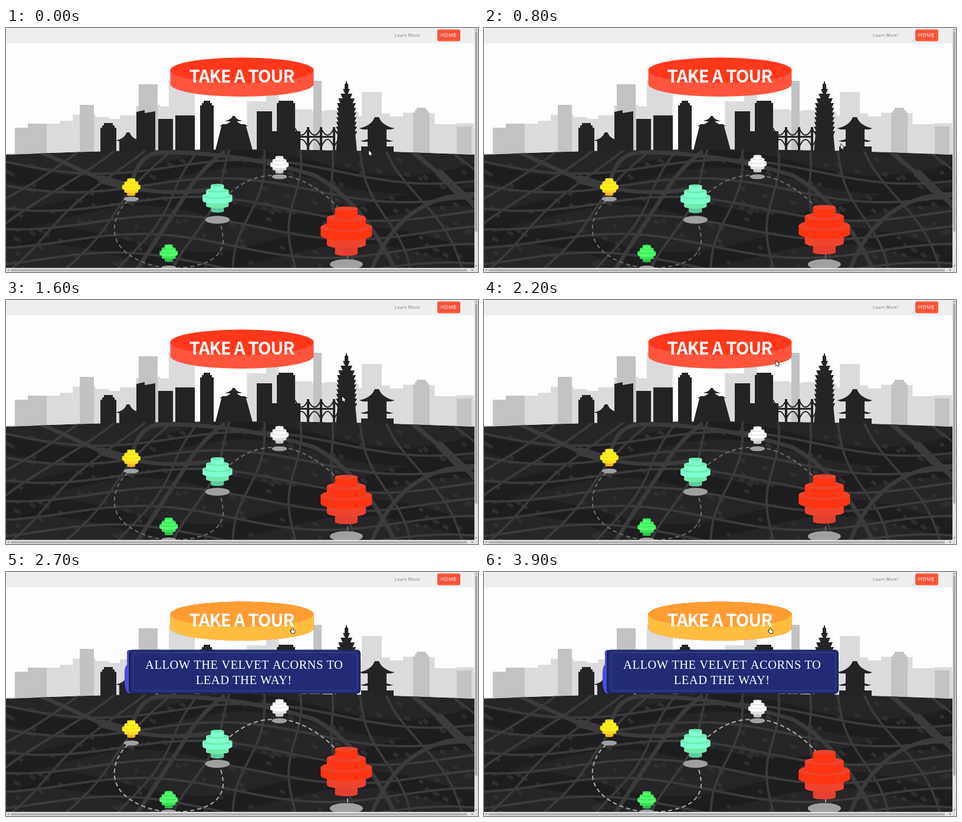
An HTML page with a canvas for the animation above (4000 ms loop, 800x416 px).

```html
<!DOCTYPE html>
<html lang="en">
<head>
<meta charset="utf-8">
<title>Take a tour</title>
<style>
html, body { margin: 0; width: 100%; height: 100%; overflow: hidden; background: #fdfcfe; }
canvas { display: block; }
</style>
</head>
<body>
<canvas id="stage" width="800" height="416"></canvas>
<script>
const W = 800, H = 416, EDGE = 794, LOOP = 4000, HOVER = 2280;
const INK = '#242325', MID = '#c3c2c4', LIGHT = '#dbdadc', ROAD = '#3b3a3c';
const stage = document.getElementById('stage').getContext('2d');

function fillPath(c, d, color) {
  c.fillStyle = color;
  c.fill(new Path2D(d));
}

function strokePath(c, d, color, width) {
  c.strokeStyle = color;
  c.lineWidth = width;
  c.stroke(new Path2D(d));
}

function box(c, x, y, w, h, color, r = 0) {
  c.fillStyle = color;
  c.beginPath();
  c.roundRect(x, y, w, h, r);
  c.fill();
}

function oval(c, x, y, rx, ry, color) {
  c.fillStyle = color;
  c.beginPath();
  c.ellipse(x, y, rx, ry, 0, 0, Math.PI * 2);
  c.fill();
}

function disc(c, x, top, bottom, rx, ry, wall, lid) {
  c.fillStyle = wall;
  c.beginPath();
  c.ellipse(x, top, rx, ry, 0, Math.PI, 0);
  c.ellipse(x, bottom, rx, ry, 0, 0, Math.PI);
  c.fill();
  oval(c, x, top, rx, ry, lid);
}

function label(c, text, x, y, font, spacing, color = '#fff') {
  c.font = font;
  c.fillStyle = color;
  c.letterSpacing = spacing + 'px';
  c.textAlign = 'center';
  c.fillText(text, x + spacing / 2, y);
}

// smooth open line through y = f(x) or x = f(y)
function curve(c, from, to, point, width) {
  c.beginPath();
  for (let s = from; s <= to; s += 6) c.lineTo(...point(s));
  c.lineWidth = width;
  c.stroke();
}

function seeded(seed) {
  return () => (seed = (seed * 16807) % 2147483647) / 2147483647;
}

function layer(paint) {
  const canvas = document.createElement('canvas');
  canvas.width = W;
  canvas.height = H;
  paint(canvas.getContext('2d'));
  return canvas;
}

function tower(c, color, x, y, w, steps = 0) {
  for (let s = 0; s <= steps; s++) {
    const top = y + 4 * (steps - s);
    box(c, x + 3 * s, top, w - 6 * s, 220 - top, color);
  }
}

function roof(c, x, y, half, h) {
  const low = y + h * 0.9;
  fillPath(c, `M${x - half} ${low}Q${x - half * 0.3} ${y + h * 0.7} ${x - half * 0.12} ${y}H${x + half * 0.12}
    Q${x + half * 0.3} ${y + h * 0.7} ${x + half} ${low}L${x + half * 0.8} ${y + h}H${x - half * 0.8}Z`, INK);
}

function paintFarSkyline(c) {
  const rand = seeded(21);
  for (let x = 38, w; x < EDGE; x += w) {
    w = 18 + rand() * 20;
    const y = 108 + Math.abs(x - 400) * 0.12 + rand() * 22;
    if (x < 300 || x > 405) tower(c, LIGHT, x, y, w + 1);
  }
  tower(c, LIGHT, 276, 90, 44);
  tower(c, LIGHT, 603, 109, 34);
  tower(c, MID, 15, 170, 22);
  tower(c, MID, 37, 163, 32);
  tower(c, MID, 125, 131, 24);
  tower(c, MID, 225, 96, 32);
  tower(c, MID, 521, 90, 14);
  tower(c, MID, 690, 136, 28, 2);
  tower(c, MID, 764, 168, 25);
  tower(c, MID, 0, 214, EDGE);
}

function paintTallTower(c, x) {
  box(c, x - 1, 91, 2, 30, INK);
  box(c, x - 3, 95, 6, 12, INK);
  for (let i = 0; i < 10; i++) {
    const y = 104 + i * 8, half = Math.min(15 + i * 0.35, 6 + i * 4);
    fillPath(c, `M${x - half} ${y}H${x + half}L${x + half - 4} ${y + 9}H${x - half + 4}Z`, INK);
  }
  fillPath(c, `M${x - 15} 180H${x + 15}L${x + 18} 212H${x - 18}Z`, INK);
}

function paintBridge(c) {
  box(c, 499, 184, 56, 3, INK);
  for (let x = 490; x < 560; x += 22) {
    box(c, x + 20, 169, 4, 40, INK);
    strokePath(c, `M${x} 171Q${x + 11} 194 ${x + 22} 171M${x} 204Q${x + 11} 176 ${x + 22} 204`, INK, 2);
  }
}

function paintNearSkyline(c) {
  tower(c, INK, 160, 162, 27, 2);
  tower(c, INK, 258, 155, 25);
  tower(c, INK, 287, 149, 33);
  tower(c, INK, 329, 124, 23, 2);
  tower(c, INK, 425, 142, 26);
  tower(c, INK, 459, 124, 31, 1);
  tower(c, INK, 451, 176, 48);
  fillPath(c, 'M221 212V143L235 140V145L253 142V212Z', INK);

  roof(c, 207, 178, 20, 15);
  tower(c, INK, 192, 192, 29);

  roof(c, 386, 150, 14, 9);
  roof(c, 386, 156, 25, 12);
  fillPath(c, 'M354 212L366 164H406L419 212Z', INK);

  paintBridge(c);
  paintTallTower(c, 577);

  roof(c, 628.5, 152, 30, 21);
  roof(c, 628.5, 180, 28, 14);
  tower(c, INK, 613, 172, 32);
  tower(c, INK, 602, 202, 55);
}

// dark parkland, a street grid that fans out from the horizon, and main roads
function paintMap(c) {
  const ground = `M0 216Q400 198 ${EDGE} 216V416H0Z`;
  c.save();
  c.clip(new Path2D(ground));
  fillPath(c, ground, '#262527');

  c.lineCap = c.lineJoin = 'round';
  c.strokeStyle = '#1e1d1f';
  for (let i = 0; i < 3; i++)
    curve(c, 0, W, x => [x, 245 + i * 65 + 22 * Math.sin(x / 85 + i * 2)], 30);

  const rand = seeded(77);
  for (let i = 0; i < 130; i++) {
    c.save();
    c.translate(rand() * EDGE, 216 + rand() * 190);
    c.rotate(0.4 + rand() * 0.3);
    box(c, 0, 0, 7 + rand() * 6, 6, '#302f31', 1);
    c.restore();
  }

  c.strokeStyle = ROAD;
  for (let i = 0; i < 6; i++)
    curve(c, 0, W, x => [x, 228 + i * 33 + 16 * Math.sin(x / 90 + i * 0.5) + 0.03 * x], 4);
  for (let i = -6; i <= 7; i++)
    curve(c, 206, 416, y => [440 + i * (52 + (y - 206) * 0.22) - (y - 206) * 0.25 + 9 * Math.sin(y / 34 + i), y], 4);

  strokePath(c, 'M60 212L166 260Q260 290 345 275M215 258Q228 210 270 212Q400 212 525 252M368 212Q342 232 320 260L222 412', ROAD, 7);
  strokePath(c, 'M690 212Q725 240 795 300M620 412Q670 284 795 283M520 250Q600 290 660 412', ROAD, 7);
  strokePath(c, 'M162 258L205 270M735 248L774 286', ROAD, 14);
  c.restore();
}

function paintRoute(c, color) {
  c.setLineDash([7, 5]);
  c.lineCap = 'butt';
  strokePath(c, 'M207 294C186 313 179 340 187 361C198 388 240 409 283 409C327 409 365 397 368 364Q368 345 362 332', color, 2);
  strokePath(c, 'M379 281C405 261 425 250 464 251C502 254 536 277 562 305M579 386V400', color, 2);
  c.setLineDash([]);
  for (const { x, w, shadow } of LANTERNS) {
    const rx = Math.min(w * 0.41, 28);
    oval(c, x, shadow, rx, rx * 0.32, '#a09fa1');
  }
}

function paintButton(c, wall, lid) {
  disc(c, 400, 72, 95.5, 121.5, 21.5, wall, lid);
  const text = 'TAKE A TOUR', room = 178;
  const font = size => `900 ${size}px "Noto Sans CJK JP", "Open Sans", sans-serif`;
  c.letterSpacing = '-1px';
  c.font = font(100);
  const size = 100 * (room + text.length) / (c.measureText(text).width + text.length);
  label(c, text, 400, 82 + size * 0.37, font(size), -1);
}

function paintBanner(c) {
  fillPath(c, 'M212 133H207Q204 135 205 142V158Q200 162 201 180Q200 200 207 207H212Z', '#4a4ae0');
  box(c, 208, 132.5, 393, 75, '#1d2356', 6);
  box(c, 211, 133.5, 388, 73, '#232b76', 5);
  c.strokeStyle = '#46508f';
  c.lineWidth = 0.8;
  c.beginPath();
  c.roundRect(215.5, 137.5, 380, 65, 6);
  c.stroke();
  const font = '20.5px "Liberation Serif", serif';
  label(c, 'ALLOW THE VELVET ACORNS TO', 403.5, 165, font, 0.5);
  label(c, 'LEAD THE WAY!', 403, 191, font, 0.5);
}

function paintChrome(c) {
  box(c, 0, 0, EDGE, 26, '#f0eeef');
  label(c, 'Learn More!', 680.5, 15, '7px Inter, sans-serif', 0.3, '#858386');
  box(c, 731, 2.5, 39, 20, '#ff5339', 3);
  label(c, 'HOME', 750, 15.3, '8.5px "Liberation Sans", sans-serif', 0.8);

  box(c, EDGE, 0, 6, H, '#e3e2e4');
  box(c, EDGE + 1, 6, 4, 341, '#aaa9ab');
  box(c, 0, 409, W, 7, '#e3e2e4');
  box(c, 8, 411, 773, 4, '#b4b3b5');
  fillPath(c, 'M797 1.5L799 4H795ZM797 407L799 404.5H795ZM2 412.8L5 411V414.6ZM792 412.8L789 411V414.6Z', '#77767a');
}

// each lantern floats on its own slow cosine, highest value of y at time `peak`
const LANTERNS = [
  { x: 212.3, w: 31, shadow: 291.5, mid: 254, amp: 2.5, peak: 200, period: 7600, colors: ['#fff01f', '#ffd426', '#f5b020'] },
  { x: 358.3, w: 50.5, shadow: 327, mid: 267.6, amp: 1.7, peak: 2600, period: 5800, colors: ['#7dffd3', '#71eba9', '#5fc9a0'] },
  { x: 463.5, w: 31, shadow: 253.5, mid: 216.6, amp: 1.7, peak: -200, period: 3700, colors: ['#ffffff', '#dfdee0', '#c9c8ca'] },
  { x: 275.8, w: 31, shadow: 409, mid: 371.5, amp: 2.5, peak: 3500, period: 7000, colors: ['#50ff6c', '#39df57', '#2fbd49'] },
  { x: 576.8, w: 87, shadow: 403, mid: 301.2, amp: 3.7, peak: -150, period: 4600, colors: ['#ff3513', '#f0432d', '#e43f30'] }
];

function drawLantern(c, { x, w, mid, amp, peak, period, colors }, t) {
  const y = mid + amp * Math.cos(2 * Math.PI * (t - peak) / period);
  const [bright, soft, deep] = colors;
  for (let tier = 0; tier < 5; tier++) {
    const half = w * (0.5 - 0.12 * Math.abs(tier - 2) ** 1.22);
    const top = y + w * (0.76 - 0.18 * tier);
    const wall = [deep, soft][tier] || bright;
    disc(c, x, top, top + w * 0.16, half, half * 0.2, wall, soft);
  }
}

// time, x, y of the pointer tip
const POINTER = [[0, 615, 209], [600, 612, 208], [1200, 590, 178], [1800, 560, 158], [2260, 485, 96]];

function pointerAt(t) {
  const next = POINTER.findIndex(p => p[0] > t);
  if (next < 0) return POINTER.at(-1).slice(1);
  const [t0, x0, y0] = POINTER[next - 1], [t1, x1, y1] = POINTER[next];
  const k = (t - t0) / (t1 - t0);
  return [x0 + (x1 - x0) * k, y0 + (y1 - y0) * k];
}

function drawPointer(c, t) {
  const shape = t < HOVER
    ? 'M0 0V8L1.9 6.3L3.2 9L4.6 8.4L3.3 5.8H5.8Z'
    : 'M-1 1Q0-.5 1 1V3L4 3.5Q5 4 4.5 6L4 8H-.5L-3 5Q-3 4-1 4.6Z';
  c.save();
  c.translate(...pointerAt(t));
  c.lineJoin = 'round';
  strokePath(c, shape, '#111', 1.6);
  fillPath(c, shape, '#fff');
  c.restore();
}

const idleScene = layer(c => {
  box(c, 0, 0, W, H, '#fdfcfe');
  paintFarSkyline(c);
  paintNearSkyline(c);
  paintMap(c);
  paintRoute(c, '#706f72');
  paintButton(c, '#ff553d', '#ff381b');
});

const hoverScene = layer(c => {
  c.drawImage(idleScene, 0, 0);
  paintRoute(c, '#a4a3a5');
  paintButton(c, '#ffbd40', '#ff9d33');
  paintBanner(c);
});

const chrome = layer(paintChrome);

function draw(t) {
  stage.drawImage(t < HOVER ? idleScene : hoverScene, 0, 0);
  for (const lantern of LANTERNS) drawLantern(stage, lantern, t);
  stage.drawImage(chrome, 0, 0);
  drawPointer(stage, t);
}

const start = performance.now();
function tick() {
  draw((performance.now() - start) % LOOP);
  requestAnimationFrame(tick);
}
tick();
</script>
</body>
</html>
```
